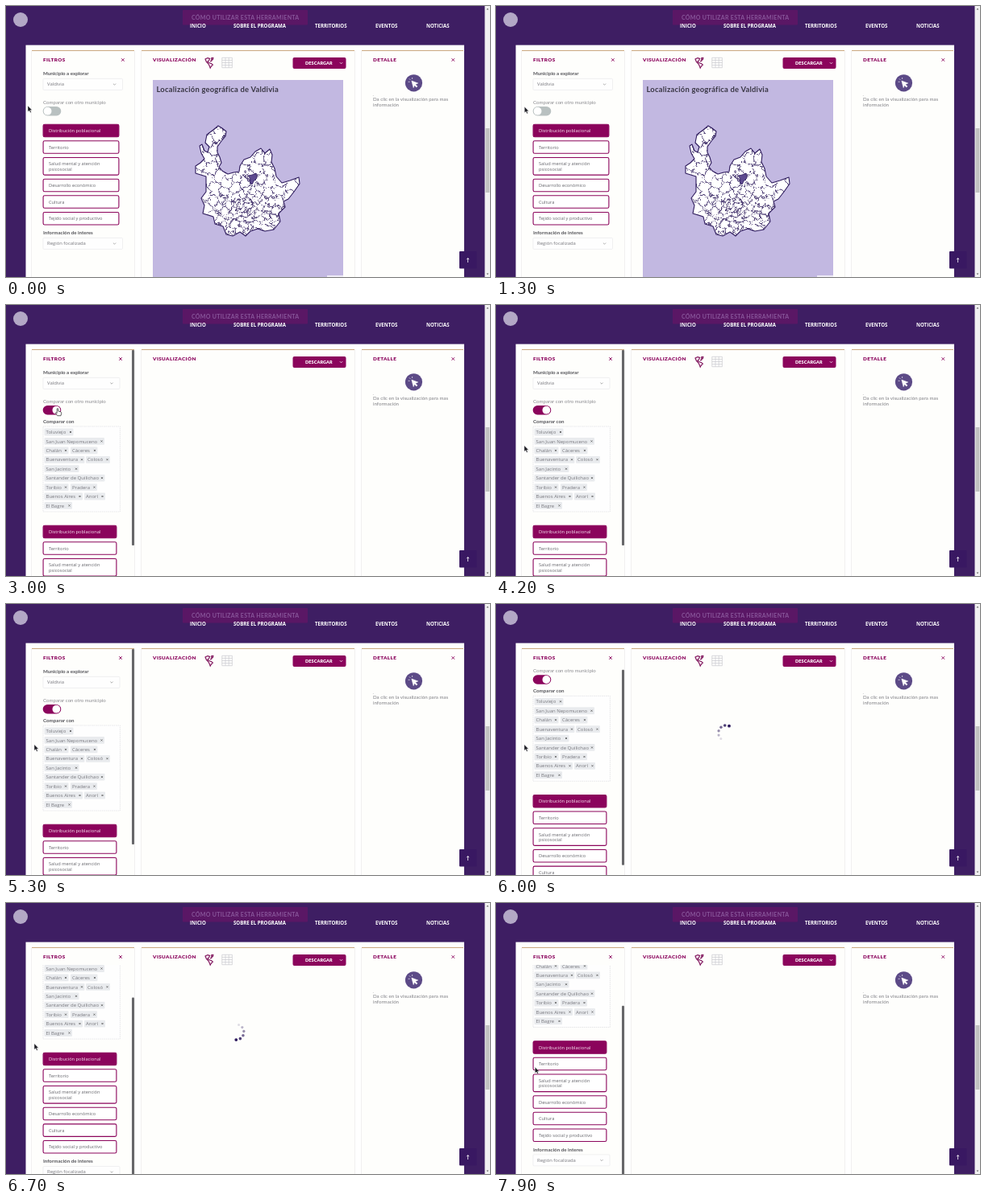
Animation, 600 px wide and 337 px high, one loop 8000 ms. Source, as an HTML page:

```html
<!DOCTYPE html>
<html lang="es">
<head>
<meta charset="utf-8">
<title>Visualización</title>
<style>
  html, body { margin: 0; width: 100%; height: 100%; overflow: hidden; background: #3e1e63; }
  svg { display: block; width: 100%; height: 100%; }
  text { white-space: pre; }
  .round { font-family: Lato, sans-serif; }
  .plain { font-family: "Open Sans", "Noto Sans", sans-serif; }
</style>
</head>
<body>
<svg id="stage" viewBox="0 0 600 337"></svg>
<script>
const WINE = '#8b045c', PURPLE = '#3e1e63', INK = '#2d1a5c', GREY = '#77777d';
const LOOP = 8000, OPEN_AT = 3000;

// ---------- markup helpers ----------
const rect = (x, y, w, h, fill, extra = '') =>
  `<rect x="${x}" y="${y}" width="${w}" height="${h}" fill="${fill}" ${extra}/>`;
const circle = (x, y, r, fill, extra = '') =>
  `<circle cx="${x}" cy="${y}" r="${r}" fill="${fill}" ${extra}/>`;
const path = (d, stroke, width = 1, fill = 'none', extra = '') =>
  `<path d="${d}" stroke="${stroke}" stroke-width="${width}" fill="${fill}" ${extra}/>`;
// y is the vertical middle of the capitals
const label = (font, x, y, size, fill, str, weight = 400, spacing = 0) =>
  `<text class="${font}" x="${x}" y="${y + size * .36}" font-size="${size}" fill="${fill}"
    font-weight="${weight}" letter-spacing="${spacing}">${str}</text>`;
const round = (...args) => label('round', ...args);
const plain = (...args) => label('plain', ...args);
const cross = (x, y, r, color, width) =>
  path(`M${x - r} ${y - r}l${2 * r} ${2 * r}m0 ${-2 * r}l${-2 * r} ${2 * r}`, color, width);
const chevron = (x, y, color) => path(`M${x - 1.6} ${y - .8}l1.6 1.6 1.6-1.6`, color, .8);
const group = (id, body, extra = '') => `<g id="${id}" ${extra}>${body}</g>`;

// ---------- map ----------
const outline = [
  [263,149],[268,152],[273,156],[272,162],[267,168],[262,175],[262,182],[265,188],[267,195],
  [264,200],[268,205],[275,209],[282,207],[289,206],[290,199],[295,191],[303,188],[309,181],
  [316,177],[321,183],[327,178],[330,185],[329,194],[333,202],[335,212],[342,220],[352,217],
  [363,213],[364,221],[357,231],[350,240],[344,243],[346,250],[338,258],[340,268],[332,278],
  [321,280],[312,277],[303,280],[297,286],[290,281],[281,286],[273,284],[269,274],[259,271],
  [257,262],[244,258],[246,248],[242,239],[248,231],[248,212],[235,208],[235,199],[241,195],
  [246,190],[242,183],[240,174],[243,172],[246,180],[250,182],[252,175],[247,170],[249,160],[257,154]];
const polygon = points => 'M' + points.map(p => p.map(n => n.toFixed(1)).join(' ')).join('L') + 'Z';

function districtSites() {
  let seed = 11;
  const random = () => (seed = seed * 16807 % 2147483647) / 2147483647;
  const sites = [];
  for (let i = 0; i < 4000; i++) {
    const x = 234 + 132 * random(), y = 147 + 140 * random();
    const gap = y < 200 ? 11 : 4.5 + Math.hypot(x - 297, y - 253) / 9;
    if (sites.every(s => Math.hypot(s[0] - x, s[1] - y) > gap)) sites.push([x, y]);
  }
  return sites;
}

// Keeps the part of a cell that lies nearer to a than to b
function cutCell(cell, a, b) {
  const side = p => (p[0] - (a[0] + b[0]) / 2) * (b[0] - a[0]) + (p[1] - (a[1] + b[1]) / 2) * (b[1] - a[1]);
  return cell.flatMap((p, i) => {
    const q = cell[(i + 1) % cell.length], s = side(p), r = side(q);
    const kept = s <= 0 ? [p] : [];
    if (s * r < 0) kept.push(p.map((v, k) => v + (q[k] - v) * s / (s - r)));
    return kept;
  });
}

function map() {
  const sites = districtSites();
  const frame = [[230, 140], [370, 140], [370, 290], [230, 290]];
  const cells = sites.map(a => sites.reduce((cell, b) => a === b ? cell : cutCell(cell, a, b), frame));
  const edge = polygon(outline);
  return rect(182, 92, 236, 245, '#c2b8e1') +
    round(186.5, 103.2, 9.4, '#3a3745', 'Localización geográfica de Valdivia', 700, .23) +
    `<clipPath id="land"><path d="${edge}"/></clipPath>
     <filter id="wobble" color-interpolation-filters="sRGB">
       <feTurbulence baseFrequency=".12" numOctaves="2" seed="4" result="noise"/>
       <feDisplacementMap in="SourceGraphic" in2="noise" scale="9" xChannelSelector="R" yChannelSelector="G"/>
     </filter>` +
    path(edge, 'none', 0, '#fff') +
    `<g clip-path="url(#land)">${path(cells.map(polygon).join(''), INK, .6, 'none', 'filter="url(#wobble)"')}</g>` +
    path('M300 211L305 210L310 208L311 214L307 218L305 222L302 219L303 215Z', INK, .8, '#5d4a8f') +
    path(edge, INK, 1.1, 'none', 'stroke-linejoin="round"') +
    rect(398, 335, 20, 2, '#eeebf6');
}

// ---------- filter panel ----------
const tags = [
  [['Toluviejo', 49.5, 80]],
  [['San Juan Nepomuceno', 49.5, 118.5]],
  [['Chalán', 49.5, 74], ['Cáceres', 82, 110]],
  [['Buenaventura', 49.5, 94], ['Colosó', 101, 125.5]],
  [['San Jacinto', 49.5, 87]],
  [['Santander de Quilichao', 49.5, 119]],
  [['Toribio', 49.5, 74], ['Pradera', 82, 109.5]],
  [['Buenos Aires', 49.5, 91.5], ['Anorí', 99, 119.5]],
  [['El Bagre', 49.5, 78.5]]];
const topics = [
  [147, 'Distribución poblacional'], [167.5, 'Territorio'],
  [188.3, 'Salud mental y atención', 'psicosocial'],
  [215, 'Desarrollo económico'], [235.6, 'Cultura'], [256.3, 'Tejido social y productivo']];

const select = (y, width, str) =>
  rect(46, y, width, 14, '#fefefe', 'stroke="#e6e6e9" stroke-width=".6" rx="1"') +
  plain(51, y + 6.9, 5.9, GREY, str) + chevron(36 + width, y + 7, '#999');

const topicButton = ([y, ...lines], i, width) =>
  rect(46.1, y + .2, width, lines.length > 1 ? 21.6 : 15.5, i ? '#fff' : WINE,
    `stroke="${WINE}" stroke-width="1.1" rx="1.8"`) +
  lines.map((line, k) => plain(53, y + 8 + k * 6.3, 5.7, i ? '#66666c' : '#f7e9f2', line)).join('');

const tagRow = (row, i) => row.map(([name, x, closeX]) => {
  const y = 158 + i * 11.43;
  return rect(x - 2, y - 4.4, closeX - x + 5.5, 8.8, '#e9ebee', 'rx="1"') +
    plain(x, y, 6, GREY, name) + cross(closeX, y, 1, '#555', .8);
}).join('');

function filters(open) {
  const fieldWidth = open ? 95 : 98.5, buttonWidth = open ? 90.8 : 93.8;
  return round(46, 84, 6.2, '#55555b', 'Municipio a explorar', 700) +
    select(90.4, fieldWidth, 'Valdivia') +
    round(46, 119.5, 6.1, '#8b8b90', 'Comparar con otro municipio') +
    rect(45.7, 125, 22.6, 11.4, open ? WINE : '#b9c1c1', 'rx="5.7"') +
    circle(open ? 62.4 : 51.6, 130.7, 4.9, '#fff') +
    (open ? round(46, 144.6, 6.2, '#55555b', 'Comparar con', 700) +
      rect(46, 151, 95.4, 106, '#fefefe', 'stroke="#dcdce0" stroke-width=".7" stroke-dasharray="1.5 1"') +
      tags.map(tagRow).join('') : '') +
    `<g transform="translate(0 ${open ? 127 : 0})">` +
    topics.map((topic, i) => topicButton(topic, i, buttonWidth)).join('') +
    round(46, 282, 6.2, '#55555b', 'Información de interes', 700) +
    select(288.4, fieldWidth, 'Región focalizada') + '</g>';
}

// ---------- page ----------
const panel = (x, w, title, titleX) =>
  rect(x - 1, 56, w + 2, 290, '#f1f0f0') + rect(x, 56, w, 290, '#fefefc') +
  rect(x, 55, w, 1, '#cba880') + round(titleX, 66.3, 6.3, WINE, title, 900, .4);

const header =
  circle(18, 17, 9, '#b3a8c6') +
  rect(219, 5, 155, 18.5, '#5a1765', 'rx="1"') +
  round(230, 14.9, 7, '#88569a', 'CÓMO UTILIZAR ESTA HERRAMIENTA', 700, .3) +
  [[228, 'INICIO'], [282, 'SOBRE EL PROGRAMA'], [383, 'TERRITORIOS'], [458, 'EVENTOS'], [521, 'NOTICIAS']]
    .map(([x, str]) => plain(x, 24.4, 6.1, '#fff', str, 700)).join('');

const viewIcons =
  path('M247 66l3-1.4 2.6.8-1 2.6-1.6 1 1.4 1.6 3 .8 2 1.6-2 2-1.2 2.2-1-2.8-1.4-2.6-2.4-2.4zM254.6 64.8l2.2-.4-.4 2.2-1.6.8zM253 68.6l2.4-.4', '#7a0c55', 1.1, '#f6e6f0') +
  path('M267.8 64.3h12.6v12.4h-12.6zM267.8 67.4h12.6m-12.6 3.1h12.6m-12.6 3.1h12.6M272 64.3v12.4m4.2 -12.4v12.4', '#cacad0', .7);

const detail =
  circle(505.5, 95.8, 10.6, '#5c4a87') +
  path('M502.8 93l8 3-3.2 1.4 2.4 2.5-1.2 1.2-2.5-2.4-1.2 3z', '#fff', .5, '#fff') +
  path('M500 90.5l1.3 1.3M503.6 89v1.8M498.7 94.3h1.8', '#fff', .7) +
  plain(454.5, 110, 5, GREY, '.') +
  round(455, 116, 6.15, '#808086', 'Da clic en la visualización para mas') +
  round(455, 122.6, 6.15, '#808086', 'información');

const pageScrollbar =
  rect(593.5, 0, 6.5, 337, '#f1f1f1') + rect(594.6, 152, 4.8, 80, '#c1c1c1') +
  path('M595.6 4.5l1.4-1.8 1.4 1.8zM595.6 332.5l1.4 1.8 1.4-1.8z', 'none', 0, '#606060');

const arrowCursor = path('M0 0v7.6l1.8-1.6 1.3 2.7 1.2-.6-1.2-2.6h2.3z', '#fff', .4, '#1c1c22');
const handCursor = path('M-.8 0q.8-1 1.6 0v3l3.2.9q.9.4.7 1.6l-.7 3.2h-4.2l-2.6-3.4q.2-1.3 2 .2z', '#222', .7, '#fff');

const stage = document.getElementById('stage');
stage.innerHTML =
  rect(0, 0, 600, 337, PURPLE) + header +
  rect(24.5, 48.6, 543.5, 290, '#fff') +
  panel(32, 127, 'FILTROS', 46) + panel(168, 264, 'VISUALIZACIÓN', 182) + panel(441, 126, 'DETALLE', 455) +
  group('close', cross(0, 67, 1.8, WINE, .9)) + cross(554.3, 67, 1.8, WINE, .9) +
  group('icons', viewIcons) +
  rect(355.5, 64, 66, 14, WINE, 'rx="2"') +
  round(371, 71, 5.5, '#fff', 'DESCARGAR', 900, .1) + chevron(415.5, 71, '#fff') +
  group('map', map()) + group('spinner', '') + detail +
  '<clipPath id="content"><rect x="32" y="77" width="127" height="260"/></clipPath>' +
  group('closed', filters(false)) +
  `<g clip-path="url(#content)">${group('open', filters(true))}</g>` +
  rect(156, 56, 3, 243, '#67676a', 'id="thumb" rx="1"') +
  rect(562, 305, 21.5, 21.5, '#391862', 'rx="1"') +
  path('M572.6 319v-5.4m-1.5 1.6l1.5-1.6 1.5 1.6', '#fff', .8) +
  pageScrollbar + group('arrow', arrowCursor) + group('hand', handCursor);

// ---------- motion ----------
const part = id => document.getElementById(id);
const show = (id, visible) => part(id).setAttribute('display', visible ? 'inline' : 'none');
const move = (id, x, y) => part(id).setAttribute('transform', `translate(${x} ${y})`);
const progress = (t, from, to) => Math.min(1, Math.max(0, (t - from) / (to - from)));
const ease = p => p * p * (3 - 2 * p);

// start, end, x, y of each pointer move
const pointerMoves = [[1000, 2000, 65.2, 129.7], [2300, 2900, 64, 129], [3300, 4100, 35, 174.7], [7700, 7900, 48.3, 204]];

function pointerAt(t) {
  return pointerMoves.reduce(([x, y], [from, to, nextX, nextY]) => {
    const p = ease(progress(t, from, to));
    return [x + (nextX - x) * p, y + (nextY - y) * p];
  }, [27, 124]);
}

function spinner(t) {
  const head = (t - 6300) / 1600 * 2 * Math.PI;
  return Array.from({ length: 6 }, (_, i) => {
    const angle = head - i * .56;
    return circle(285.3 + 9.6 * Math.cos(angle), 160.5 + 9.6 * Math.sin(angle),
      1.9 - i * .08, INK, `opacity="${1 - i * .17}"`);
  }).join('');
}

function render(t) {
  const open = t >= OPEN_AT;
  const scroll = 102.5 * progress(t, 5500, 6900);
  const loading = t >= 5500 && t < 7100;
  show('map', !open);
  show('closed', !open);
  show('open', open);
  show('thumb', open);
  show('icons', t < OPEN_AT || t >= OPEN_AT + 100);
  show('spinner', loading);
  if (loading) part('spinner').innerHTML = spinner(Math.min(t, 6900));
  move('close', open ? 142 : 144.8, 0);
  move('open', 0, -scroll);
  move('thumb', 0, scroll * .7);

  const [x, y] = pointerAt(t);
  const onToggle = x > 46 && y > 124 && y < 137;
  show('hand', onToggle);
  show('arrow', !onToggle);
  move(onToggle ? 'hand' : 'arrow', x, y);
}

const start = performance.now();
function tick() {
  render((performance.now() - start) % LOOP);
  requestAnimationFrame(tick);
}
tick();
</script>
</body>
</html>
```
